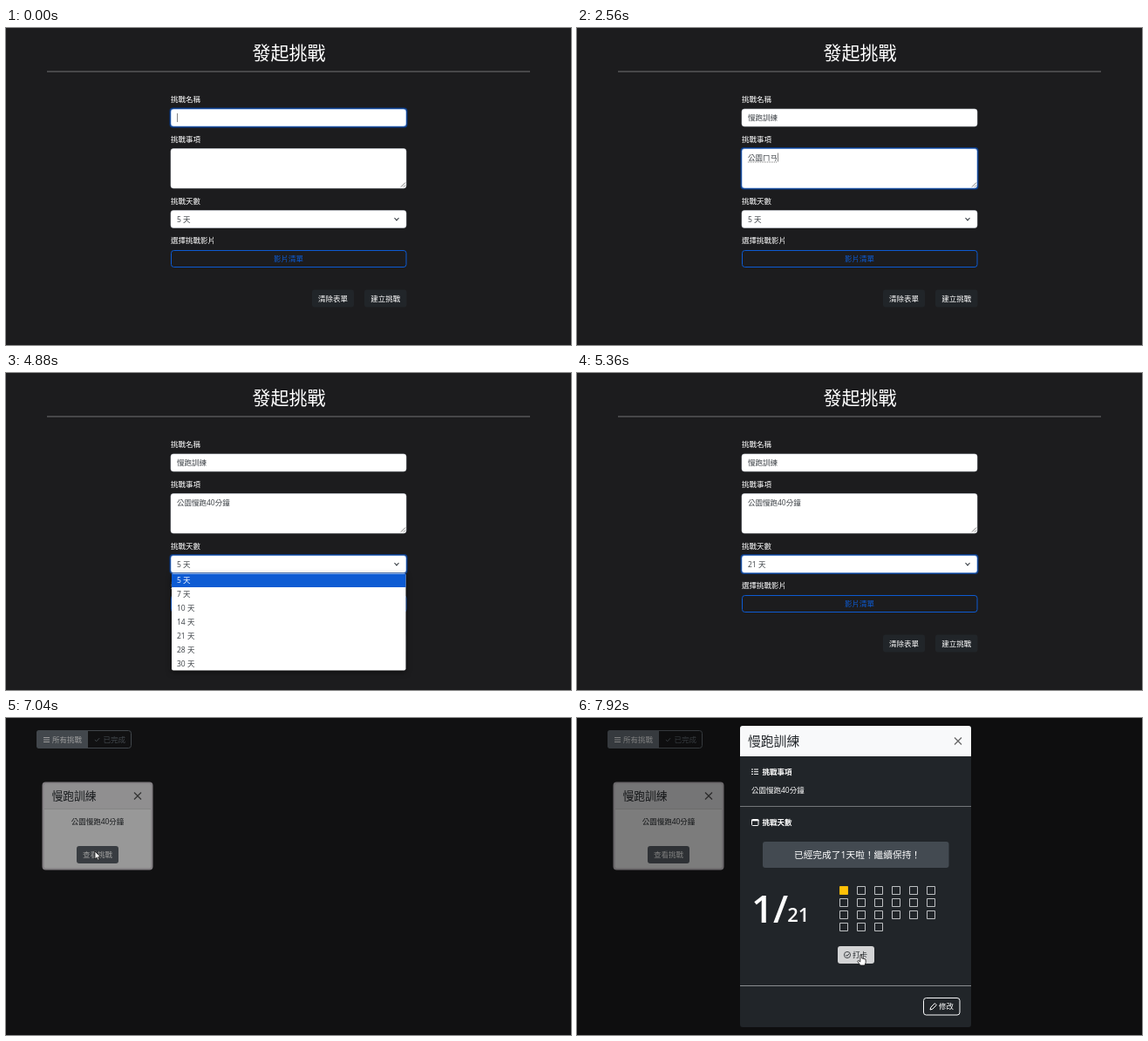
These frames come from a looping animation (648 by 364 pixels, 8 s). An HTML page with a canvas:

```html
<!DOCTYPE html>
<html lang="zh-Hant">
<head>
<meta charset="utf-8">
<title>發起挑戰</title>
<style>
html, body { margin: 0; width: 100%; height: 100%; overflow: hidden; background: #1c1c1e; }
canvas { display: block; width: 648px; height: 364px; }
</style>
</head>
<body>
<canvas id="stage" width="648" height="364"></canvas>
<script>
const ctx = document.getElementById('stage').getContext('2d');
const LOOP = 8000, TICK = 80;
const FONT = '"Open Sans", "Noto Sans CJK TC", "Noto Sans CJK JP", "Noto Sans CJK", sans-serif';
const BG = '#1c1c1e', INK = '#3a3f44', WHITE = '#fff', BLUE = '#0d5bd3';

const NAME = [['慢', 'ㄇㄢ'], ['跑', 'ㄆㄠ'], ['訓', 'ㄒㄩㄣ'], ['練', 'ㄌㄧㄢ']];
const TASK = [['公', 'ㄍㄨㄥ'], ['園', 'ㄩㄢ'], ['慢', 'ㄇㄢ'], ['跑', 'ㄆㄠ'],
  ['4', ''], ['0', ''], ['分', 'ㄈㄣ'], ['鐘', 'ㄓㄨㄥ']];
const DAYS = [5, 7, 10, 14, 21, 28, 30];

// Every state the input method passes through, one per key press
function keyStates(chars) {
  const states = [''];
  let done = '';
  for (const [char, sounds] of chars) {
    for (let k = 1; k <= sounds.length; k++) states.push(done + sounds.slice(0, k));
    done += char;
    states.push(done);
  }
  return states;
}
const nameStates = keyStates(NAME), taskStates = keyStates(TASK);

const clamp = v => Math.max(0, Math.min(1, v));
const span = (t, from, to) => clamp((t - from) / (to - from));
const easeOut = p => 1 - (1 - p) ** 2;
const smooth = p => p * p * (3 - 2 * p);
const mix = (a, b, p) => a + (b - a) * p;

function typed(states, t, start, step) {
  const i = t < start ? 0 : Math.floor((t - start) / step) + 1;
  return states[Math.min(i, states.length - 1)];
}

// y is the vertical middle of the characters
function text(str, x, y, size = 8.5, color = WHITE, align = 'left', weight = 400) {
  ctx.font = `${weight} ${size}px ${FONT}`;
  ctx.textAlign = align;
  ctx.fillStyle = color;
  ctx.fillText(str, x, y + size * 0.37);
  return ctx.measureText(str).width;
}

function box(x, y, w, h, r, fill, stroke, width = 1) {
  ctx.beginPath();
  ctx.roundRect(x, y, w, h, r);
  if (fill) { ctx.fillStyle = fill; ctx.fill(); }
  if (stroke) { ctx.strokeStyle = stroke; ctx.lineWidth = width; ctx.stroke(); }
}

function path(points, color, width = 1, fill) {
  ctx.beginPath();
  points.forEach(([x, y], i) => i ? ctx.lineTo(x, y) : ctx.moveTo(x, y));
  if (fill) { ctx.closePath(); ctx.fillStyle = fill; ctx.fill(); }
  ctx.strokeStyle = color;
  ctx.lineWidth = width;
  ctx.stroke();
}

const line = (x1, y1, x2, y2, color, width) => path([[x1, y1], [x2, y2]], color, width);
const check = (x, y, s, color) => path([[x - s, y], [x - s * 0.3, y + s * 0.7], [x + s, y - s * 0.7]], color, 1);

function cross(x, y, s, color) {
  line(x - s, y - s, x + s, y + s, color, 1.2);
  line(x - s, y + s, x + s, y - s, color, 1.2);
}

function field(y, h, focused) {
  if (focused) box(187.5, y - 1.5, 273, h + 3, 4, '#0c3b85');
  box(189, y, 270, h, 3, WHITE, focused ? '#3f78cc' : '#ced4da', 0.6);
}

function entry(str, y, focused, composing, caret) {
  const w = str ? text(str, 196, y, 8.5, INK) : 0;
  if (composing && w) {
    ctx.setLineDash([1, 1]);
    line(196, y + 5.5, 196 + w, y + 5.5, '#555', 0.8);
    ctx.setLineDash([]);
  }
  if (focused && caret) line(196.5 + w, y - 5, 196.5 + w, y + 5, '#666', 0.8);
}

function grip(y) {
  line(453, y, 458, y - 5, '#555', 0.8);
  line(456, y, 458, y - 2, '#555', 0.8);
}

function dropdown(pick) {
  ctx.save();
  ctx.shadowColor = 'rgba(0,0,0,.5)';
  ctx.shadowBlur = 6;
  ctx.shadowOffsetY = 2;
  box(190, 230, 268.5, 111.5, 2, WHITE);
  ctx.restore();
  DAYS.forEach((d, i) => {
    const y = 238 + i * 15.9;
    if (i === pick) { ctx.fillStyle = BLUE; ctx.fillRect(190, y - 7.5, 268.5, 15.5); }
    text(d + ' 天', 196, y, 8.5, i === pick ? WHITE : INK);
  });
}

function drawForm(t) {
  const sent = t >= 5920;
  const onName = t < 1200, onTask = t >= 1200 && t < 4560, onDays = t >= 4560 && t < 5440;
  const name = sent ? '' : typed(nameStates, t, 80, 72);
  const task = sent ? '' : typed(taskStates, t, 1440, 140);
  const caretSince = onName ? 0 : 1200;
  const caret = (t - caretSince) % 1060 < 530 || t >= 1440 || (t > 80 && t < 1100);

  text('發起挑戰', 324.5, 28, 21, WHITE, 'center', 300);
  line(47, 50, 601, 50, '#737375', 1);
  [['挑戰名稱', 82], ['挑戰事項', 128], ['挑戰天數', 199], ['選擇挑戰影片', 244]]
    .forEach(([label, y]) => text(label, 189, y));

  field(93, 20, onName);
  entry(name, 103, onName, t < 1100, caret);
  field(138.5, 45.5, onTask);
  entry(task, 148.5, onTask, t < 4480, caret);
  grip(182.5);

  field(209.5, 20, onDays);
  text((t >= 5280 && !sent ? 21 : 5) + ' 天', 196, 219.5, 8.5, INK);
  path([[445.5, 218], [448, 220.8], [450.5, 218]], '#343a40', 1.1);

  box(189.5, 255.5, 269.5, 19, 3, null, BLUE);
  text('影片清單', 324, 265, 8.5, BLUE, 'center');

  box(351, 300.5, 48, 20, 3, '#212529');
  text('清除表單', 375, 311, 8.5, WHITE, 'center');
  const pressed = t >= 5680;
  box(411, 300.5, 48.5, 20, 3, pressed ? '#424549' : '#212529', pressed ? '#505357' : null);
  text('建立挑戰', 435.3, 311, 8.5, WHITE, 'center');

  if (t >= 4720 && t < 5280) dropdown(Math.max(0, Math.min(4, Math.floor((t - 4880) / 80))));
  if (sent) text('挑戰建立成功，快去查看吧！', 324, 352.5, 8.5, WHITE, 'center', 500);
}

function drawList(hover) {
  box(35.5, 14.5, 108, 20, 3, null, '#6c757d');
  box(35, 14, 59, 21, [3, 0, 0, 3], '#6c757d');
  for (let i = 0; i < 3; i++) line(43, 22.5 + i * 2.5, 50, 22.5 + i * 2.5, WHITE, 1);
  text('所有挑戰', 53, 25, 8.5);
  check(104.5, 25, 2.6, '#6c757d');
  text('已完成', 111.5, 25, 8.5, '#6c757d');

  box(42.5, 74.5, 125, 99, 3, '#f9f9f9', '#d5cfd5', 2);
  ctx.fillStyle = '#ecebed';
  ctx.fillRect(44, 76, 122, 28);
  line(44, 104.5, 166, 104.5, '#dadada', 1);
  text('慢跑訓練', 52.5, 89.5, 12.75, '#24282c');
  cross(151, 89.5, 4, '#555');
  text('公園慢跑40分鐘', 105, 119, 8.5, '#24282c', 'center');
  box(81, 147, 48, 20, 3, hover ? '#5c636a' : '#6c757d');
  text('查看挑戰', 105, 157, 8.5, WHITE, 'center');
}

function drawModal(done, hover) {
  box(187, 9, 265, 346, 3, '#212529');
  box(187, 9, 265, 35, [3, 3, 0, 0], '#f8f9fa');
  text('慢跑訓練', 196, 26.5, 14.8, '#212529');
  cross(437, 26.5, 4, '#666');

  for (let i = 0; i < 3; i++) {
    const y = 59 + i * 2.7;
    line(200, y, 202, y, WHITE, 1);
    line(203, y, 208, y, WHITE, 1);
  }
  text('挑戰事項', 212.5, 61.7, 8.5, WHITE, 'left', 700);
  text('公園慢跑40分鐘', 200, 82.5);
  line(187, 101.5, 452, 101.5, '#74777a', 1);

  box(200.5, 116.5, 7.5, 7, 1, null, WHITE);
  line(200, 117.5, 208.5, 117.5, WHITE, 1.6);
  text('挑戰天數', 212.5, 120, 8.5, WHITE, 'left', 700);

  box(213, 142, 213.5, 30, 3, '#434a51');
  text(`已經完成了${done}天啦！繼續保持！`, 321.5, 157, 10.7, WHITE, 'center');

  const w = text(done + '/', 200, 219, 44, WHITE, 'left', 600);
  text('21', 200 + w - 1, 226.2, 22, WHITE, 'left', 600);

  for (let i = 0; i < 21; i++) {
    const x = 301.5 + (i % 6) * 19.9, y = 193.5 + Math.floor(i / 6) * 14;
    const on = i < done;
    box(Math.floor(x) + 0.5, y, 9, 9, 0, on ? '#ffc107' : null, on ? '#ffc107' : '#d0d2d4', 0.9);
  }

  box(299, 262, 42, 20, 3, hover ? '#d3d4d5' : '#f8f9fa');
  ctx.beginPath();
  ctx.arc(310, 272, 3.6, 0, 7);
  ctx.strokeStyle = '#212529';
  ctx.lineWidth = 0.8;
  ctx.stroke();
  check(310.2, 272, 1.9, '#212529');
  text('打卡', 316, 272, 8.5, '#212529');

  line(187, 307.5, 452, 307.5, '#8a8d90', 1);
  box(397.5, 321.5, 41.5, 19.5, 3, null, '#f8f9fa');
  path([[405, 335], [405.8, 332.2], [410.3, 327.6], [412.3, 329.6], [407.8, 334.2]], WHITE, 1, 'transparent');
  text('修改', 415, 331.3, 8.5);
}

function drawPointer(x, y, hand) {
  const shape = hand
    ? [[0, 0], [1.6, 0], [1.8, 4], [6, 5], [6.2, 8.5], [5, 12], [0, 12], [-3.2, 7.5], [-2.4, 6.4], [-0.2, 8]]
    : [[0, 0], [0, 9], [2.1, 7.2], [3.6, 10.4], [5, 9.8], [3.6, 6.7], [6.3, 6.5]];
  path([...shape, shape[0]].map(([dx, dy]) => [x + dx, y + dy]), '#111', 0.8, WHITE);
}

function drawChallenges(t) {
  drawList(t >= 6800);
  ctx.fillStyle = `rgba(0,0,0,${0.5 * easeOut(span(t, 6960, 7110))})`;
  ctx.fillRect(0, 0, 648, 364);

  const done = t >= 7680 ? 1 : 0, onPunch = t >= 7520;
  if (t >= 7110) {
    ctx.save();
    ctx.globalAlpha = span(t, 7110, 7260);
    ctx.translate(0, -28 * (1 - easeOut(span(t, 7110, 7410))));
    drawModal(done, onPunch);
    ctx.restore();
  }

  if (t < 6560) return;
  const come = smooth(span(t, 6560, 6820)), go = smooth(span(t, 7280, 7580));
  const x = mix(mix(185, 102, come), 325, go), y = mix(mix(112, 153, come), 272, go);
  drawPointer(x, y, onPunch || (t >= 6800 && t < 7000));
}

function frame(now) {
  const t = Math.floor((now % LOOP) / TICK) * TICK;
  ctx.fillStyle = BG;
  ctx.fillRect(0, 0, 648, 364);
  if (t < 6480) drawForm(t);
  else drawChallenges(t);
  requestAnimationFrame(frame);
}

const start = performance.now();
requestAnimationFrame(function first() {
  frame(0);
  requestAnimationFrame(function tick() { });
});
</script>
</body>
</html>
```
